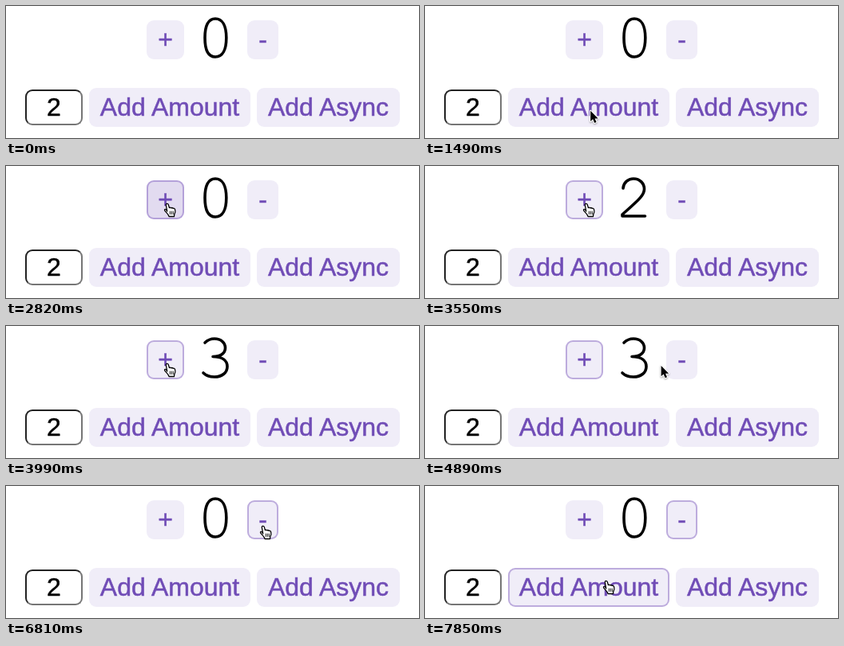
Write an HTML page with a canvas that moves like this. It is 517 px wide and 166 px high and loops after 8 s.

```html
<!DOCTYPE html>
<html lang="en">
<head>
<meta charset="utf-8">
<title>Counter</title>
<style>
  html, body { margin: 0; width: 100%; height: 100%; overflow: hidden; background: #fff; }
  #stage { position: relative; width: 517px; height: 166px; overflow: hidden; font: 32px "Liberation Sans", Arial, sans-serif; -webkit-text-stroke: .5px; }
  #stage div { position: absolute; box-sizing: border-box; text-align: center; white-space: nowrap; border: 2px solid transparent; border-radius: 9px; }
  #stage .btn { height: 49px; line-height: 44px; color: rgb(112, 76, 182); }
  #plus { left: 176px; top: 18px; width: 47px; }
  #minus { left: 302px; top: 18px; width: 39px; }
  #amount { left: 104px; top: 103px; width: 202px; }
  #async { left: 314px; top: 103px; width: 179px; }
  #stage .field { left: 24px; top: 105px; width: 72px; height: 45px; line-height: 40px; color: #000; border-color: #222 #767676 #767676 #222; }
  canvas { position: absolute; left: 0; top: 0; width: 517px; height: 166px; }
</style>
</head>
<body>
<div id="stage">
  <div class="btn" id="plus">+</div>
  <div class="btn" id="minus">-</div>
  <div class="field">2</div>
  <div class="btn" id="amount">Add Amount</div>
  <div class="btn" id="async">Add Async</div>
  <canvas></canvas>
</div>
<script>
const LOOP = 8000;
const TICK = 147.8;
const buttons = [...document.querySelectorAll('.btn')];
const [plus, minus] = buttons;
const canvas = document.querySelector('canvas');
const ctx = canvas.getContext('2d');
const ratio = window.devicePixelRatio || 1;
canvas.width = 517 * ratio;
canvas.height = 166 * ratio;

const digits = [
  'M262 16C271 16 275.8 25 275.8 40S271 64 262 64 249 55 249 40 253 16 262 16Z',
  'M249 22L262 16V63M248 63H276',
  'M248 28C248.5 21 254 16 261 16C269 16 274.5 22 274.5 29C274.5 37 267 43 247 61V63H275.5',
  'M249 21C252 18 256 16 261 16C269 16 274.5 21 274.5 27.5C274.5 34 269 38.5 259 38.5C270 38.5 277 43 277 51C277 59 270 64 261 64C255 64 250 62 247 59'
].map(d => new Path2D(d));

const arrow = new Path2D('M0 0V13.4L3 10.5 5 15.3 7.4 14.3 5.4 9.7H9.5Z');
const hand = new Path2D('M4.3 10.5L2.9 3.2Q2.5 1 4 .8 5.4 .6 5.9 2.4L6.9 6.2Q7.8 5 9.2 6.4 10.4 5.5 11.6 6.8 13.6 6.2 14.2 8.6 15 12 13.2 14.5L13 17H6.6Q6 14.8 3.6 12.4L1.2 9.6Q.6 8 2 7.8 3.2 8 4.3 10.5Z');
const creases = new Path2D('M7.8 10.6V14M9.8 10.6V14M11.8 10.6V14');

// Times are in ticks
const entry = { x: 209, y: 168 };
const moves = [
  { from: 7, to: 14, x: 201, y: 47, power: .65 },
  { from: 30, to: 35, x: 321, y: 50, power: 1.67 },
  { from: 48, to: 53, x: 226, y: 119, power: 2 }
];
const clicks = [
  { button: plus, down: 18, up: 20 },
  { button: plus, down: 23, up: 23 },
  { button: plus, down: 26, up: 27 },
  { button: minus, down: 38, up: 38 },
  { button: minus, down: 42, up: 43 },
  { button: minus, down: 45, up: 45 }
];

const violet = alpha => `rgba(112, 76, 182, ${alpha})`;

function pointerAt(n) {
  let { x, y } = entry, progress = 0;
  for (const m of moves.filter(m => n > m.from)) {
    progress = Math.min(1, (n - m.from) / (m.to - m.from));
    const k = 1 - (1 - progress) ** m.power;
    x += (m.x - x) * k;
    y += (m.y - y) * k;
  }
  return { x, y, progress };
}

const isOver = (b, { x, y }) =>
  x >= b.offsetLeft && x <= b.offsetLeft + b.offsetWidth &&
  y >= b.offsetTop && y <= b.offsetTop + b.offsetHeight;

function drawArrow(x, y) {
  ctx.translate(x + .6, y + .6);
  ctx.strokeStyle = '#fff';
  ctx.lineWidth = 2.2;
  ctx.shadowColor = 'rgba(0, 0, 0, .35)';
  ctx.shadowBlur = 2 * ratio;
  ctx.shadowOffsetY = ratio;
  ctx.stroke(arrow);
  ctx.shadowColor = 'transparent';
  ctx.fillStyle = '#000';
  ctx.fill(arrow);
}

function drawHand(x, y) {
  ctx.translate(x - 3.5, y - .5);
  ctx.fillStyle = '#fff';
  ctx.lineWidth = 1.3;
  ctx.fill(hand);
  ctx.stroke(hand);
  ctx.lineWidth = .9;
  ctx.stroke(creases);
}

function draw(t) {
  const n = Math.floor(t / TICK);
  const pointer = pointerAt(n);
  const hovered = buttons.find(b => isOver(b, pointer));
  const last = clicks.filter(c => c.down <= n).pop();
  const count = clicks.filter(c => c.up <= n)
    .reduce((sum, c) => sum + (c.button === plus ? 1 : -1), 0);

  for (const b of buttons) {
    const focused = last && last.button === b;
    const pressed = focused && n < last.up;
    // Hover only shows once the page has been clicked
    b.style.borderColor = violet(focused || (last && hovered === b) ? .4 : 0);
    b.style.backgroundColor = violet(pressed ? .1 + .05 * Math.min(2, n - last.down + 1) : .1);
  }

  ctx.setTransform(ratio, 0, 0, ratio, 0, 0);
  ctx.clearRect(0, 0, 517, 166);
  ctx.strokeStyle = '#000';
  ctx.lineWidth = 3.6;
  ctx.lineCap = ctx.lineJoin = 'round';
  ctx.stroke(digits[count]);
  const drawPointer = hovered && pointer.progress > .5 ? drawHand : drawArrow;
  drawPointer(pointer.x, pointer.y);
}

const start = performance.now();
function frame() {
  draw((performance.now() - start) % LOOP);
  requestAnimationFrame(frame);
}
frame();
</script>
</body>
</html>
```
